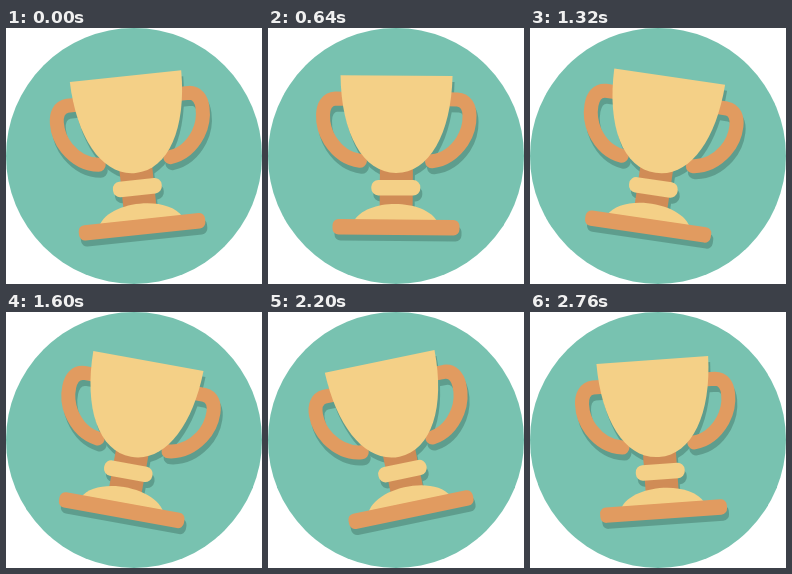
Animation, 256 px wide and 256 px high, one loop 2.8 s. Source, as an HTML page:

```html
<!DOCTYPE html>
<html lang="en">
<head>
<meta charset="utf-8">
<title>Swinging trophy</title>
<style>
  html, body { margin: 0; height: 100%; overflow: hidden; background: #fff; }
  svg { display: block; width: 100vw; height: 100vh; }
  .shadow { filter: drop-shadow(2px 6px 0 #5e9d8d); }
  .gold { fill: #f4d087; }
  .bronze { fill: #e19b60; }
  .shade { fill: #d08c56; }
  .handle { fill: none; stroke: #e19b60; stroke-width: 14; stroke-linecap: round; }
</style>
</head>
<body>
<svg viewBox="0 0 256 256">
  <circle cx="128" cy="128" r="128" fill="#78c2b0"/>
  <g class="shadow">
    <g id="trophy">
      <path id="handle" class="handle" d="M78 71H67C50 72 53 99 62 113Q74 131 92 133"/>
      <use href="#handle" transform="matrix(-1 0 0 1 256 0)"/>
      <rect class="shade" x="112" y="138" width="33" height="44"/>
      <path class="gold" d="M72 47.7H184C183 106 161 145 128 145S73 106 72 47.7Z"/>
      <rect class="gold" x="103.5" y="152" width="49" height="15.5" rx="7"/>
      <path class="gold" d="M86 194C98 170 158 170 170 194Z"/>
      <rect class="bronze" x="65" y="191.5" width="127" height="15.5" rx="6"/>
    </g>
  </g>
</svg>
<script>
  const LOOP = 2800;
  // [time in ms, tilt in degrees], eased in and out between neighbours
  const KEYS = [[-337, -15.7], [234, -0.7], [370, -0.7], [1705, 10.5], [2370, -15.7], [2941, -0.7]];
  const trophy = document.getElementById('trophy');

  function tilt(time) {
    const next = KEYS.findIndex(([end]) => time < end);
    const [start, from] = KEYS[next - 1];
    const [end, to] = KEYS[next];
    const progress = (time - start) / (end - start);
    return from + (to - from) * (1 - Math.cos(Math.PI * progress)) / 2;
  }

  function draw() {
    trophy.setAttribute('transform', `rotate(${tilt(performance.now() % LOOP)} 128 128)`);
    requestAnimationFrame(draw);
  }
  draw();
</script>
</body>
</html>
```
